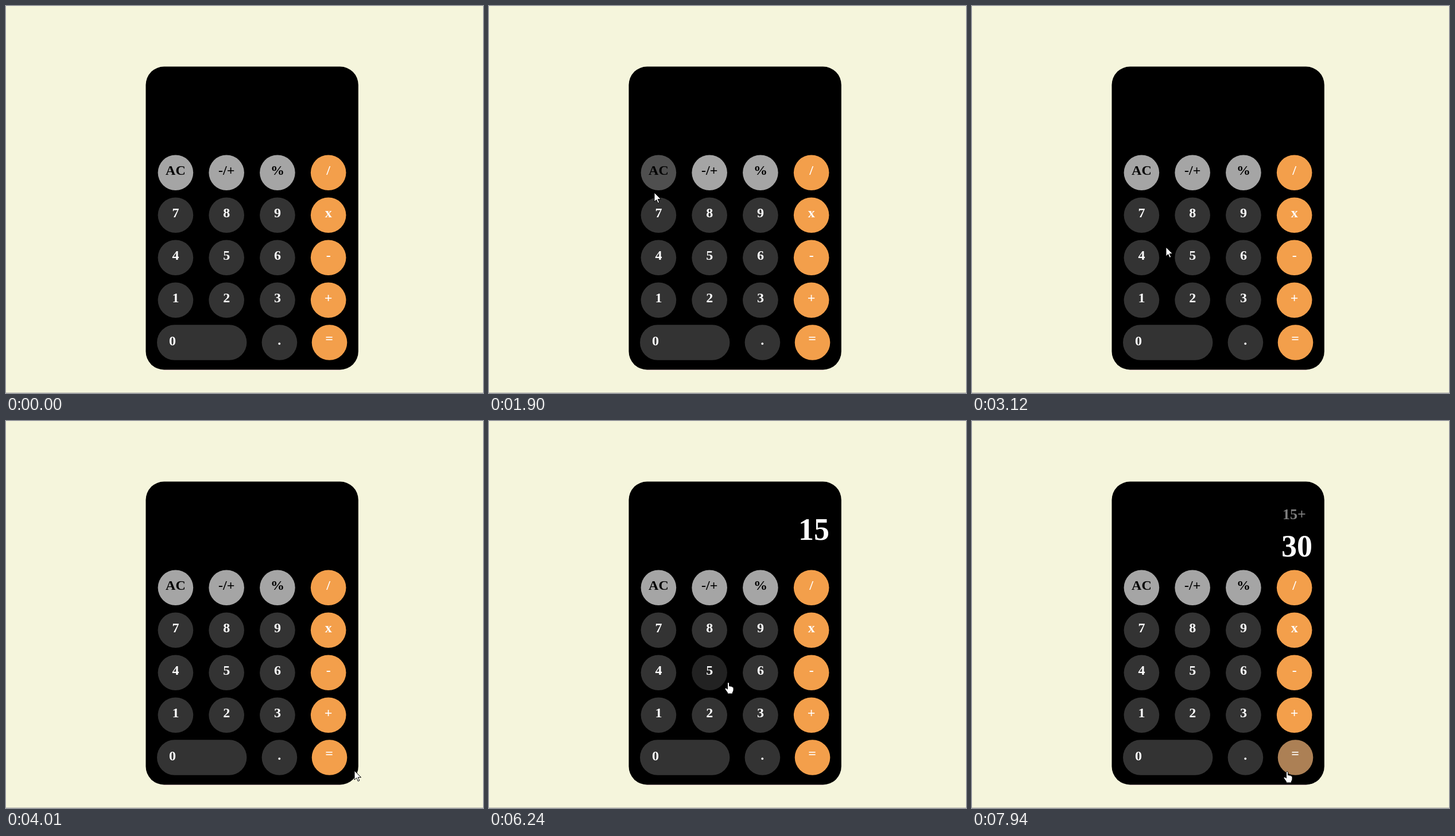
Recreate the animation shown at these times as an HTML page. Size 831x674 px, loop 8 s.

```html
<!DOCTYPE html>
<html lang="en">
<head>
<meta charset="utf-8">
<title>Calculator</title>
<style>
  html, body { margin: 0; width: 100%; height: 100%; overflow: hidden; background: #f5f5dc; }
  svg { display: block; width: 831px; height: 674px; }
  text { font: bold 24px "Liberation Serif", "Times New Roman", serif; }
  #total { font-size: 54px; fill: #fff; text-anchor: end; }
  #past { font-size: 26px; fill: #7f7f7f; }
</style>
</head>
<body>
<svg viewBox="0 0 831 674">
  <rect width="831" height="674" fill="#f5f5dc"/>
  <rect y="673" width="831" height="1" fill="#bdbdb4"/>
  <rect x="275" y="633" width="308" height="2" fill="#ffeee4"/>
  <rect x="243.5" y="105.5" width="370.3" height="528" rx="32"/>
  <text id="past" x="541" y="171"></text>
  <text id="total" x="593"></text>
  <g id="keys"></g>
  <g id="cursor" fill="#fff" stroke="#000" stroke-linejoin="round">
    <path id="arrow" d="M0 0V16L3.7 12.5L6.3 18.3L8.8 17.2L6.2 11.6H11.5Z"/>
    <path id="hand" d="M-1.5 1.5Q0 -1 1.5 1.5V7Q3 5.6 4.3 7.4Q5.8 6.4 6.8 8.2Q8.8 7.6 9 10V14Q8.6 16.5 7.3 17.6V20H-1.6V18Q-4.2 14.5 -6 11.6Q-5.4 9 -3 10.6L-1.5 12Z"/>
  </g>
</svg>
<script>
const LOOP = 8000, ENTER = 320, TICK = 68, FADE = 140;
const HOT_X = 6, HOT_Y = 4; // drawn tip relative to the hot spot
const $ = id => document.getElementById(id);

// base colour, hover colour, text colour
const STYLES = {
  grey: [[165, 165, 165], [79, 79, 79], "#000"],
  dark: [[51, 51, 51], [34, 34, 34], "#fff"],
  gold: [[243, 159, 75], [96, 95, 95], "#fff"]
};

function add(tag, attrs) {
  const el = document.createElementNS("http://www.w3.org/2000/svg", tag);
  for (const k in attrs) el.setAttribute(k, attrs[k]);
  return $("keys").appendChild(el);
}

const keys = [];
function addKey(label, style, cx, cy, textX, textY, half = 30.8) {
  const shape = add("rect", { x: cx - half, y: cy - 30.8, width: half * 2, height: 61.6, rx: 30.8 });
  const text = add("text", { x: textX, y: textY, fill: STYLES[style][2], "text-anchor": "middle" });
  text.textContent = label;
  keys.push({ label, shape, style: STYLES[style], cx, cy, half, level: 0 });
}

["AC -/+ % /", "7 8 9 x", "4 5 6 -", "1 2 3 +"].forEach((row, r) =>
  row.split(" ").forEach((label, c) => {
    const x = 295.4 + 88.75 * c, y = 290.2 + 74 * r;
    addKey(label, c == 3 ? "gold" : r ? "dark" : "grey", x, y, x, y + 3.6);
  }));
addKey("0", "dark", 341.2, 586, 290, 591, 78.2);
addKey(".", "dark", 476.4, 586, 476.2, 589.5);
addKey("=", "gold", 563.5, 586, 563, 587);

// pointer stops: time, then a key or a point
const route = [
  [340, 778, 645], [1000, "/"], [1700, "AC"], [1904, 288, 325],
  [2150, "7"], [2650, "x"], [3128, 338, 420], [3330, "1"], [3530, "+"],
  [3800, "0"], [4012, 607, 609], [4360, 718, 520], [4620, 605, 292],
  [4760, 444, 475], [4896, 324, 487], [5030, "1"], [5370, "1"],
  [5750, "5"], [6100, "5"], [6256, 417, 455], [6500, "+"], [6660, "+"],
  [6850, "3"], [7130, "3"], [7400, "0"], [7500, "0"],
  [7740, 534, 600], [7956, 549, 610]
].map(([t, x, y]) => {
  const key = keys.find(k => k.label === x);
  return key ? { t, x: key.cx + HOT_X, y: key.cy + HOT_Y } : { t, x, y };
});

function pointAt(t) {
  const i = Math.max(1, route.findIndex(p => p.t >= t));
  const a = route[i - 1], b = route[i];
  const f = (t - a.t) / (b.t - a.t);
  return { x: a.x + (b.x - a.x) * f, y: a.y + (b.y - a.y) * f };
}

function hits(key, { x, y }) {
  const dx = Math.max(Math.abs(x - HOT_X - key.cx) - key.half + 31, 0);
  return Math.hypot(dx, y - HOT_Y - key.cy) < 31;
}

// pointer and hover levels at every screen update
const states = [];
for (let t = 340; t <= 7956; t += TICK) {
  const pos = pointAt(t);
  states.push({ t, pos, levels: keys.map(k => k.level), hand: keys.some(k => hits(k, pos)) });
  for (const k of keys) {
    const step = hits(k, pos) ? TICK : -TICK;
    k.level = Math.min(1, Math.max(0, k.level + step / FADE));
  }
}

function display(t) {
  if (t < 5370) return ["", ""];
  if (t < 6000) return ["", "1"];
  if (t < 6660) return ["", "15"];
  if (t < 7130) return ["15+", ""];
  return ["15+", t < 7480 ? "3" : "30"];
}

const mix = (a, b, f) => `rgb(${a.map((c, i) => Math.round(c + (b[i] - c) * f))})`;

function draw(t) {
  const n = Math.floor((t - ENTER) / TICK);
  const state = states[Math.min(n, states.length - 1)];
  keys.forEach(({ shape, style }, i) =>
    shape.setAttribute("fill", mix(style[0], style[1], state ? state.levels[i] : 0)));

  const [past, total] = display(t);
  $("past").textContent = past;
  $("total").textContent = total;
  $("total").setAttribute("y", past ? 235.5 : 207);

  $("cursor").style.display = state ? "" : "none";
  if (!state) return;
  const { pos, hand } = state;
  $("cursor").setAttribute("transform", `translate(${Math.round(pos.x)},${Math.round(pos.y)})`);
  $("arrow").style.display = hand ? "none" : "";
  $("hand").style.display = hand ? "" : "none";
}

const start = performance.now();
function frame() {
  draw((performance.now() - start) % LOOP);
  requestAnimationFrame(frame);
}
frame();
</script>
</body>
</html>
```
